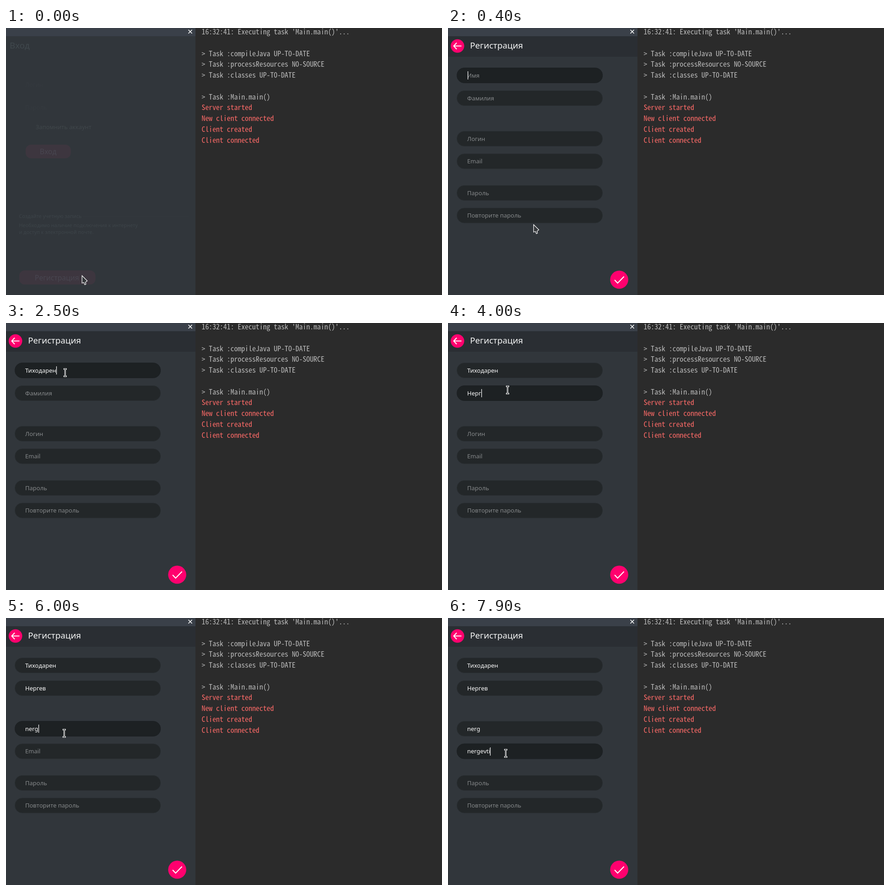
An HTML page with a canvas for the animation above (8000 ms loop, 955 by 586 pixels).

```html
<!DOCTYPE html>
<html lang="ru">
<head>
<meta charset="utf-8">
<style>
  html, body { margin: 0; width: 100%; height: 100%; overflow: hidden; background: #2b2b2b; }
  canvas { display: block; }
</style>
</head>
<body>
<canvas id="stage" width="955" height="586"></canvas>
<script>
const ctx = document.getElementById('stage').getContext('2d');
const LOOP = 8000, TICK = 100, BLINK = 500;
const SANS = '"Noto Sans", "Open Sans", sans-serif';
const MONO = '"Noto Sans Mono CJK JP", "Noto Sans Mono CJK SC", "Noto Sans Mono", monospace';
const PINK = '#ff006e', PANEL = '#31363b', WHITE = '#f4f5f5';
const FIELD_X = 19, FIELD_W = 320, FIELD_H = 33, TEXT_X = 42;
const CELL = 7.91, LINE_HEIGHT = 23.75;

// Letters appear evenly between from and to.
const fields = [
  { y: 87, prompt: 'Имя', value: 'Тиходарен', focus: 800, from: 1700, to: 2500 },
  { y: 137, prompt: 'Фамилия', value: 'Нергев', focus: 3300, from: 3600, to: 4200 },
  { y: 226, prompt: 'Логин', value: 'nerg', focus: 5000, from: 5600, to: 6000 },
  { y: 275.5, prompt: 'Email', value: 'nergevti', focus: 6900, from: 7300, to: 7900 },
  { y: 345, prompt: 'Пароль', value: '' },
  { y: 394.5, prompt: 'Повторите пароль', value: '' }
];

const pointerStops = [
  { at: 100, x: 207, y: 508, travel: 1 },
  { at: 400, x: 187, y: 431, travel: 1 },
  { at: 900, x: 129, y: 109, travel: 500 },
  { at: 3300, x: 130, y: 147, travel: 100 },
  { at: 5000, x: 127, y: 253, travel: 300 },
  { at: 6900, x: 126, y: 297, travel: 300 }
];

const buildLog = [
  "16:32:41: Executing task 'Main.main()'...", '',
  '> Task :compileJava UP-TO-DATE',
  '> Task :processResources NO-SOURCE',
  '> Task :classes UP-TO-DATE', '',
  '> Task :Main.main()'
];
const serverLog = ['Server started', 'New client connected', 'Client created', 'Client connected'];

ctx.font = `100px ${MONO}`;
const monoSize = CELL * 100 / ctx.measureText('M').width;

const clamp = v => Math.min(1, Math.max(0, v));

function text(str, x, y, size, color, family = SANS) {
  ctx.font = `${size}px ${family}`;
  ctx.fillStyle = color;
  ctx.fillText(str, x, y);
}

function rect(x, y, w, h, color) {
  ctx.fillStyle = color;
  ctx.fillRect(x, y, w, h);
}

function pill(x, y, w, h, r, fill, border) {
  ctx.beginPath();
  ctx.roundRect(x, y, w, h, r);
  ctx.fillStyle = fill;
  ctx.fill();
  if (border) stroke(border, 1);
}

function circle(x, y, r) {
  ctx.beginPath();
  ctx.arc(x, y, r, 0, Math.PI * 2);
  ctx.fillStyle = PINK;
  ctx.fill();
}

function stroke(color, width) {
  ctx.strokeStyle = color;
  ctx.lineWidth = width;
  ctx.stroke();
}

function lines(color, width, ...paths) {
  ctx.beginPath();
  for (const path of paths) path.forEach(([x, y], i) => i ? ctx.lineTo(x, y) : ctx.moveTo(x, y));
  stroke(color, width);
}

function drawConsole() {
  rect(415, 0, 540, 586, '#2b2b2b');
  [...buildLog, ...serverLog].forEach((line, i) =>
    text(line, 428.5, 14 + i * LINE_HEIGHT, monoSize, i < buildLog.length ? '#bbbbbb' : '#ff6b68', MONO));
}

function drawWindow() {
  rect(0, 0, 415, 586, PANEL);
  rect(0, 0, 415, 18, '#3a4049');
  lines('#fcfcfc', 1.6, [[399.5, 4], [407.5, 12]], [[407.5, 4], [399.5, 12]]);
}

function drawLogin(alpha) {
  const dim = '#3d4449', button = '#3d363f', label = '#484650';
  ctx.globalAlpha = alpha;
  text('Вход', 8, 45, 18.7, '#40484d');
  text('Логин', TEXT_X, 128.5, 13, '#353a3f');
  text('Пароль', TEXT_X, 178.5, 13, '#353a3f');
  text('Запомнить аккаунт', 65, 221.5, 12.8, '#40474b');
  pill(43, 256, 99, 30, 12, button);
  text('Вход', 74, 276.5, 15.6, label);
  rect(168, 413, 232, 1, '#33393e');
  text('Создайте учетную запись', 28.5, 416.5, 10.9, dim);
  text('Необходимо наличие подключения к интернету', 28.5, 436.5, 10.9, dim);
  text('и доступ к электронной почте.', 28.5, 451.5, 10.9, dim);
  pill(29, 532, 167, 31, 12, button);
  text('Регистрация', 63, 554, 15.6, label);
  ctx.globalAlpha = 1;
}

function typedCount({ value, from, to }, t) {
  if (!(t >= from)) return 0;
  return Math.floor(1 + (value.length - 1) * clamp((t - from) / (to - from)));
}

function caretVisible({ focus, from, to }, t) {
  const lastInput = t >= from ? Math.min(t, to) : focus;
  return (t - lastInput) % (2 * BLINK) < BLINK;
}

function drawField(field, t, focused) {
  const value = field.value.slice(0, typedCount(field, t));
  pill(FIELD_X + .5, field.y + .5, FIELD_W - 1, FIELD_H, 16,
    focused ? '#1d2123' : '#232729', focused ? '#1b1f22' : '#2a2f33');
  text(value || field.prompt, TEXT_X, field.y + 21.5, 13, value ? '#fcfcfc' : '#85888a');
  if (focused && caretVisible(field, t)) {
    const offset = value ? ctx.measureText(value).width : .5;
    rect(Math.round(TEXT_X + offset), Math.round(field.y + 8), 1.2, 18, '#ffffff');
  }
}

function drawRegistration(t) {
  rect(0, 18, 415, 45, '#2a2e33');
  circle(20.7, 39.5, 14.8);
  lines('#ffffff', 2, [[29.5, 39.5], [12.5, 39.5]], [[19, 32.5], [12.5, 39.5], [19, 46.5]]);
  text('Регистрация', 48.2, 45, 18.7, WHITE);
  const active = fields.filter(f => t >= f.focus).pop() || fields[0];
  fields.forEach(f => drawField(f, t, f === active));
  circle(375, 552.4, 19.8);
  lines('#ffffff', 2.2, [[365, 553], [371.5, 560], [385.5, 545.5]]);
}

function pointerAt(t) {
  let x = 166, y = 543;
  for (const stop of pointerStops) {
    const k = clamp(1 + (t - stop.at) / stop.travel);
    x += (stop.x - x) * k;
    y += (stop.y - y) * k;
  }
  return [Math.round(x), Math.round(y)];
}

function drawArrow() {
  ctx.beginPath();
  ctx.moveTo(.5, .5);
  for (const [x, y] of [[.5, 17], [4.5, 15.5], [6.5, 20.5], [9, 19.5], [8, 15], [12, 12]]) ctx.lineTo(x, y);
  ctx.closePath();
  ctx.fillStyle = '#35383b';
  ctx.fill();
  stroke('#ffffff', 1.2);
}

function drawBeam() {
  const shape = [[[-1.5, -8], [2.5, -8]], [[.5, -8], [.5, 8]], [[-1.5, 8], [2.5, 8]]];
  ctx.lineCap = 'square';
  lines('#ffffff', 3, ...shape);
  lines('#25282b', 1, ...shape);
  ctx.lineCap = 'butt';
}

function drawPointer(t) {
  const [x, y] = pointerAt(t);
  const overField = t >= 400 && fields.some(f => y >= f.y && y <= f.y + FIELD_H);
  ctx.save();
  ctx.translate(x, y);
  overField ? drawBeam() : drawArrow();
  ctx.restore();
}

function frame(now) {
  const t = Math.floor((now % LOOP) / TICK) * TICK;
  drawConsole();
  drawWindow();
  if (t < 400) drawLogin(t < 100 ? 1 : .7);
  else drawRegistration(t);
  drawPointer(t);
  requestAnimationFrame(frame);
}

frame(0);
</script>
</body>
</html>
```
